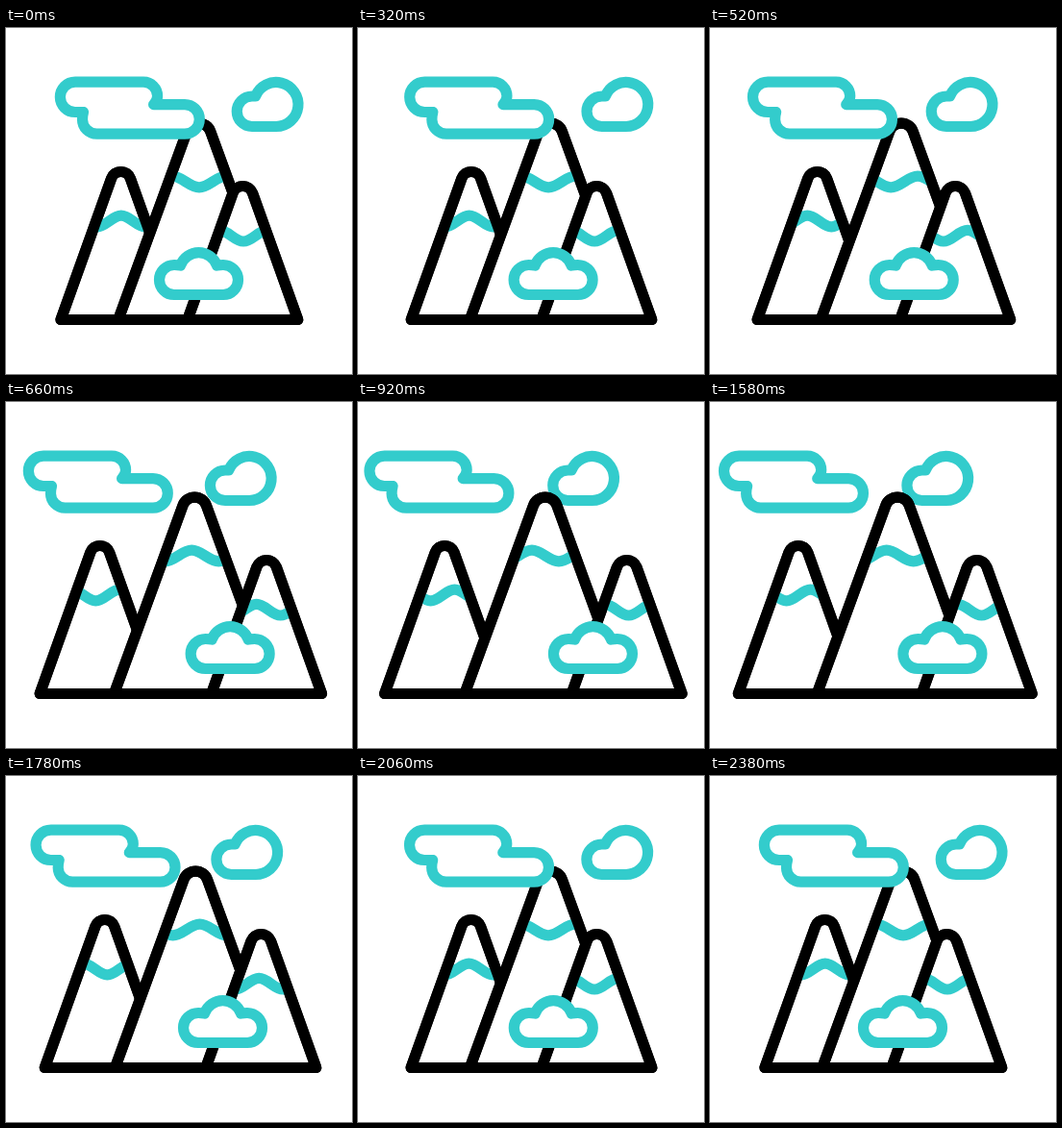
Write an HTML page that moves like this. It is 360 px wide and 360 px high and loops after 2.4 s.

```html
<!DOCTYPE html>
<html lang="en">
<head>
<meta charset="utf-8">
<title>Mountains and clouds</title>
<style>
  html, body { margin: 0; width: 100%; height: 100%; overflow: hidden; background: #fff; }
  svg { display: block; width: 100%; height: 100%; }
  path { stroke-width: 11.2; stroke-linecap: round; stroke-linejoin: round; }
  .rock { fill: #fff; stroke: #000; }
  .edge { fill: none; stroke: #000; }
  .snow { fill: none; stroke: #33cccc; }
  .cloud { fill: #fff; stroke: #33cccc; }
</style>
</head>
<body>
<svg id="scene" viewBox="0 0 360 360"></svg>
<script>
const LOOP = 2400, HALF = 1195, EASE = 0.8;
const BASE = 303.5, AMP = 5.8;
const scene = document.getElementById('scene');
const movers = [];

function add(parent, tag, attrs) {
  const node = document.createElementNS('http://www.w3.org/2000/svg', tag);
  for (const key in attrs) node.setAttribute(key, attrs[key]);
  parent.appendChild(node);
  return node;
}

// Registers a node that slides from x by dx as progress goes 0 to 1.
function slide(node, x, dx) {
  movers.push({ node, x, dx });
  return node;
}

function cloud(d, dx) {
  slide(add(scene, 'path', { class: 'cloud', d }), 0, dx);
}

// Triangle centred on x = 0 whose rounded tip touches y = top.
function peak(half, top, slope) {
  const angle = Math.atan(slope), sin = Math.sin(angle);
  const sharp = BASE - half / slope;
  const r = (top - sharp) * sin / (1 - sin);
  const x = r * Math.cos(angle), y = top + r - r * sin;
  return `M${-half} ${BASE}L${-x} ${y}A${r} ${r} 0 0 1 ${x} ${y}L${half} ${BASE}Z`;
}

// Wavy line with a trough at x = 0.
function wave(y, period) {
  const h = period / 2, k = h * 0.364;
  let d = `M${-4 * period} ${y + AMP}`;
  for (let i = 0; i < 16; i++) {
    const dy = i % 2 ? 2 * AMP : -2 * AMP;
    d += `c${k} 0 ${h - k} ${dy} ${h} ${dy}`;
  }
  return d;
}

function mountain(id, m) {
  const d = peak(m.half, m.top, m.slope);
  const group = slide(add(scene, 'g', {}), m.x, m.dx);
  add(add(group, 'clipPath', { id }), 'path', { d });
  add(group, 'path', { class: 'rock', d });
  const cap = add(group, 'g', { 'clip-path': `url(#${id})` });
  slide(add(cap, 'path', { class: 'snow', d: wave(m.snow, m.period) }), m.phase, m.drift);
  add(group, 'path', { class: 'edge', d });
}

cloud('M256 102.5A15.75 15.75 0 0 1 256 71H259.6A23 23 0 1 1 281 102.5Z', -39);

mountain('left', { x: 119.5, dx: -30.5, half: 62.5, top: 149.5, slope: 0.358,
  snow: 201, period: 50, phase: -24.7, drift: -41.5 });
mountain('middle', { x: 200.5, dx: -6, half: 83.7, top: 99.1, slope: 0.365,
  snow: 160, period: 56, phase: 0.5, drift: -44 });
mountain('right', { x: 246.3, dx: 34.7, half: 57.4, top: 164.5, slope: 0.358,
  snow: 216.2, period: 50, phase: 0.7, drift: -50.7 });

cloud('M72 56.2H143A14.6 14.6 0 0 1 157.6 70.8Q157.6 75.5 153.6 79.6H186' +
  'A15.3 15.3 0 0 1 186 110.2H94.5A15 15 0 0 1 79.5 95.2Q79.5 91 80.5 87.5H72' +
  'A15.65 15.65 0 0 1 72 56.2Z', -46.2);
cloud('M175 277.5A15.5 15.5 0 0 1 175 246.5Q179 246.5 181.5 247A20.2 20.2 0 0 1 219.5 247' +
  'Q222 246.5 226 246.5A15.5 15.5 0 0 1 226 277.5Z', 45.7);

// Symmetric cubic-bezier(EASE, 0, 1 - EASE, 1).
function ease(x) {
  if (x <= 0) return 0;
  if (x >= 1) return 1;
  let lo = 0, hi = 1;
  for (let i = 0; i < 30; i++) {
    const s = (lo + hi) / 2, q = 1 - s;
    const bx = 3 * EASE * s * q * q + 3 * (1 - EASE) * s * s * q + s * s * s;
    if (bx < x) lo = s; else hi = s;
  }
  return lo * lo * (3 - 2 * lo);
}

function draw(ms) {
  const t = ms % LOOP;
  const p = ease(t < HALF ? t / HALF : 2 - t / HALF);
  for (const { node, x, dx } of movers) {
    node.setAttribute('transform', `translate(${(x + dx * p).toFixed(3)} 0)`);
  }
}

const start = performance.now();
function tick(now) {
  draw(Math.max(0, now - start));
  requestAnimationFrame(tick);
}
draw(0);
requestAnimationFrame(tick);
</script>
</body>
</html>
```
